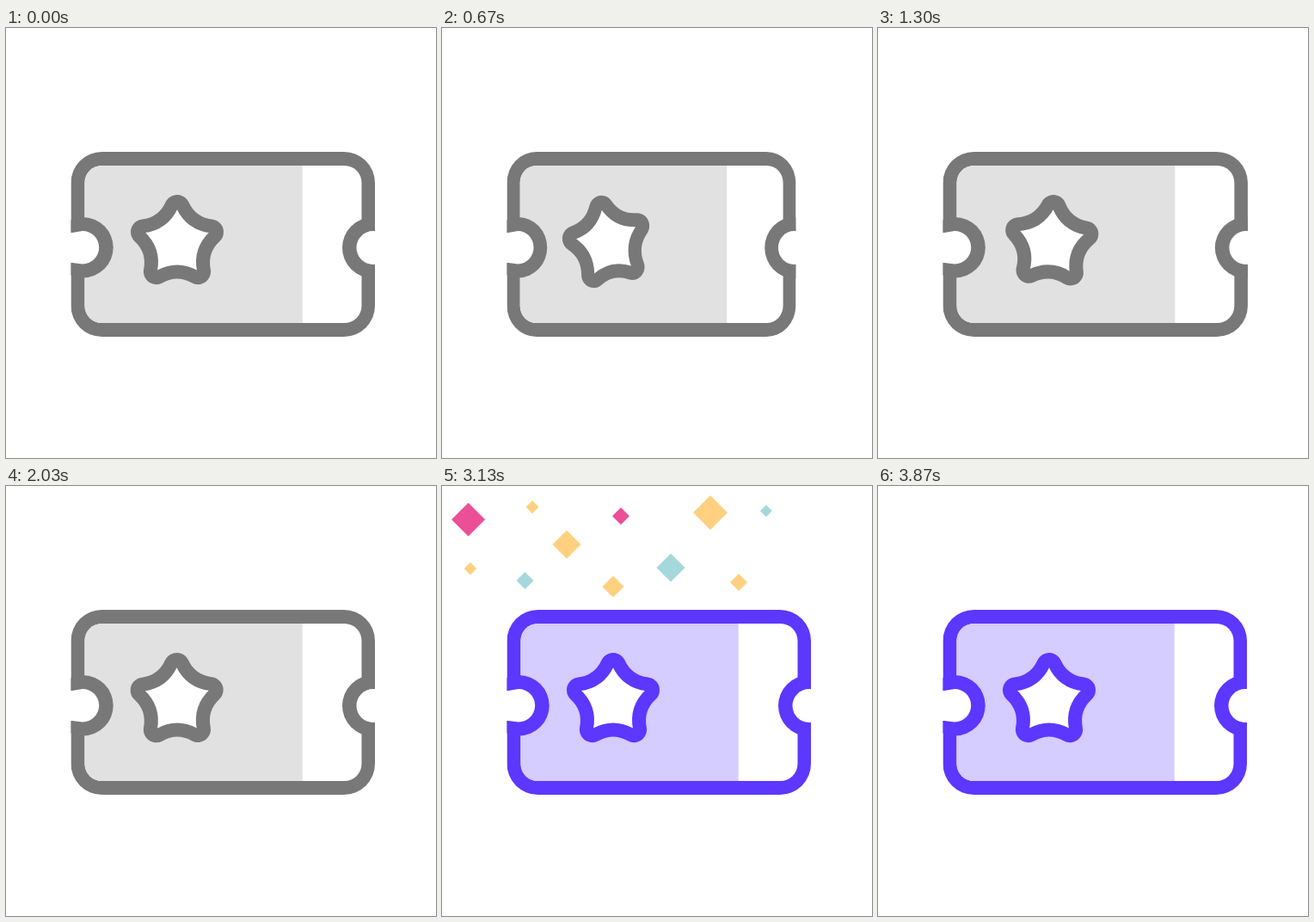
An HTML page with a canvas that plays this animation: 500x500 px, repeating every 4.01 s.

```html
<!DOCTYPE html>
<html lang="en">
<head>
<meta charset="utf-8">
<title>Ticket</title>
<style>
html, body { margin: 0; width: 100%; height: 100%; overflow: hidden; background: #fff; }
canvas { display: block; width: 500px; height: 500px; }
</style>
</head>
<body>
<canvas id="stage" width="500" height="500"></canvas>
<script>
const ctx = document.getElementById('stage').getContext('2d');
const LOOP = 4010;
const LEFT = 75.5;
const RAD = Math.PI / 180;

// [time, value] pairs, joined with sine easing
const STRETCH = [[30, 1], [500, 0.883], [930, 1.079], [1350, 1.003], [1420, 1]];
STRETCH[3][1] = 1;
const TILT = [[30, 0], [600, -11.4], [1180, 0], [1640, 20], [1880, -5], [2060, 0]];
const ROLL = [[1180, 0], [1640, 14], [1880, -4], [2060, 0]];

const PINK = '#eb4f96', GOLD = '#ffd080', TEAL = '#a5d8dc';
// start x, y, end x, y, half diagonal, colour
const CONFETTI = [
  [148, 132, 30.5, 39, 19.5, PINK],
  [172, 127, 105, 24.5, 7.5, GOLD],
  [151, 159, 208, 35, 10, PINK],
  [186, 171, 145, 68, 16.5, GOLD],
  [252, 138, 312, 31, 20, GOLD],
  [267, 110, 377, 29, 7, TEAL],
  [223, 171, 266, 95, 16.5, TEAL],
  [283, 167, 345, 112, 10, GOLD],
  [230, 191, 199, 117, 12.5, GOLD],
  [158, 165, 96.5, 110, 10, TEAL],
  [121, 158, 33, 96, 7.3, GOLD]
];

const clamp = v => Math.max(0, Math.min(1, v));
const part = (t, a, b) => clamp((t - a) / (b - a));
const sine = u => (1 - Math.cos(Math.PI * u)) / 2;
const mix = (a, b, u) => a + (b - a) * u;

function track(keys, t) {
  if (t <= keys[0][0]) return keys[0][1];
  for (let i = 1; i < keys.length; i++) {
    const [t0, v0] = keys[i - 1], [t1, v1] = keys[i];
    if (t < t1) return mix(v0, v1, sine(part(t, t0, t1)));
  }
  return keys[keys.length - 1][1];
}

function blend(a, b, u) {
  return `rgb(${a.map((v, i) => Math.round(mix(v, b[i], u))).join(',')})`;
}

function disc(x, y, r, color) {
  ctx.fillStyle = color;
  ctx.beginPath();
  ctx.arc(x, y, r, 0, 2 * Math.PI);
  ctx.fill();
}

function roundBox(x, y, w, h, r) {
  ctx.beginPath();
  ctx.roundRect(x, y, w, h, r);
}

function ticket(line, tint) {
  ctx.save();
  roundBox(LEFT, 144, 353.5, 215, 36);
  ctx.clip();
  ctx.fillStyle = line;
  ctx.fillRect(LEFT, 144, 354, 215);

  roundBox(91.5, 160, 322, 183, 20);
  ctx.fillStyle = '#fff';
  ctx.fill();
  ctx.save();
  ctx.clip();
  ctx.fillStyle = tint;
  ctx.fillRect(91, 160, 253.7, 183);
  ctx.restore();

  disc(89.5, 255.2, 35.2, line);
  disc(426.5, 255.5, 35.5, line);
  ctx.restore();

  // open notches
  ctx.fillStyle = '#fff';
  ctx.beginPath();
  ctx.moveTo(73, 238);
  ctx.lineTo(77, 238);
  ctx.lineTo(89, 236);
  ctx.arc(89, 255.2, 19.2, -Math.PI / 2, Math.PI / 2);
  ctx.lineTo(77, 273);
  ctx.lineTo(73, 273);
  ctx.fill();
  disc(427, 255.5, 19.5, '#fff');
}

function star(line, tilt, dx) {
  ctx.save();
  ctx.translate(199 + dx, 250);
  ctx.rotate(tilt * RAD);
  ctx.beginPath();
  for (let i = 0; i < 5; i++) {
    const a = (i * 72 - 90) * RAD, v = a + 36 * RAD;
    ctx.arc(41 * Math.cos(a), 41 * Math.sin(a), 7, a - 65 * RAD, a + 65 * RAD);
    const next = a + 72 * RAD, n = next - 65 * RAD;
    ctx.quadraticCurveTo(
      27.8 * Math.cos(v), 27.8 * Math.sin(v),
      41 * Math.cos(next) + 7 * Math.cos(n), 41 * Math.sin(next) + 7 * Math.sin(n));
  }
  ctx.closePath();
  ctx.fillStyle = '#fff';
  ctx.fill();
  ctx.lineWidth = 16;
  ctx.lineJoin = 'round';
  ctx.strokeStyle = line;
  ctx.stroke();
  ctx.restore();
}

function confetti(t) {
  if (t < 2170 || t > 3850) return;
  const out = 1 - Math.pow(1 - part(t, 2170, 3200), 3);
  const p = out * (1 - sine(part(t, 3200, 3760)));
  const size = part(t, 2150, 2320) * (1 - part(t, 3640, 3850));
  for (const [x0, y0, x1, y1, half, color] of CONFETTI) {
    const x = mix(x0, x1, p), y = mix(y0, y1, p), r = half * size;
    ctx.fillStyle = color;
    ctx.beginPath();
    ctx.moveTo(x, y - r);
    ctx.lineTo(x + r, y);
    ctx.lineTo(x, y + r);
    ctx.lineTo(x - r, y);
    ctx.fill();
  }
}

function draw(t) {
  const hue = part(t, 2140, 2320);
  const line = blend([120, 120, 120], [92, 55, 255], hue);
  const tint = blend([225, 225, 225], [213, 204, 255], hue);

  ctx.fillStyle = '#fff';
  ctx.fillRect(0, 0, 500, 500);
  ctx.save();
  ctx.translate(LEFT, 0);
  ctx.scale(track(STRETCH, t), 1);
  ctx.translate(-LEFT, 0);
  ticket(line, tint);
  star(line, track(TILT, t), track(ROLL, t));
  ctx.restore();
  confetti(t);
}

const begin = performance.now();
function tick() {
  draw((performance.now() - begin) % LOOP);
  requestAnimationFrame(tick);
}
tick();
</script>
</body>
</html>
```
